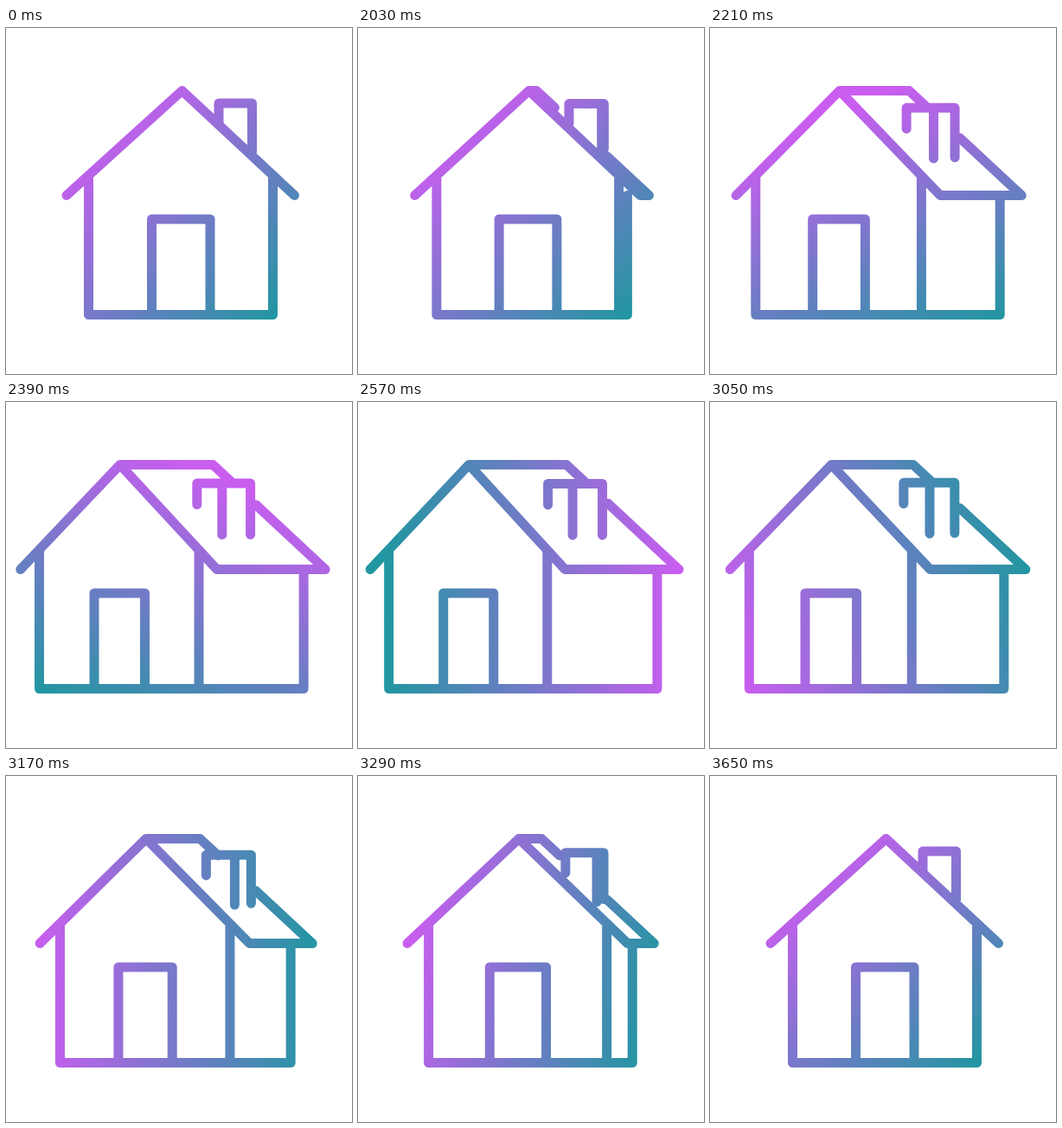
Write an HTML page that moves like this. It is 400 by 400 pixels and loops after 3.68 s.

```html
<!DOCTYPE html>
<html lang="en">
<head>
<meta charset="utf-8">
<title>House</title>
<style>
  html, body { margin: 0; width: 100%; height: 100%; overflow: hidden; background: #fff; }
  svg { display: block; width: 100%; height: 100%; }
</style>
</head>
<body>
<svg viewBox="0 0 400 400">
  <defs>
    <linearGradient id="tint" gradientUnits="userSpaceOnUse">
      <stop offset="0" stop-color="#c95df0"/>
      <stop offset="1" stop-color="#1f97a0"/>
    </linearGradient>
  </defs>
  <path id="house" fill="none" stroke="url(#tint)" stroke-width="11"
        stroke-linecap="round" stroke-linejoin="round"/>
</svg>
<script>
const LOOP = 3680, STEP = 30;
const house = document.getElementById('house');
const tint = document.getElementById('tint');

// Monotone cubic curve through [time, value] keys, flat outside them.
function curve(keys) {
  const slope = i => (keys[i + 1][1] - keys[i][1]) / (keys[i + 1][0] - keys[i][0]);
  const tangents = keys.map((_, i) => {
    if (i === 0 || i === keys.length - 1) return 0;
    const a = slope(i - 1), b = slope(i);
    return a * b <= 0 ? 0 : 2 * a * b / (a + b);
  });
  return time => {
    if (time <= keys[0][0]) return keys[0][1];
    const i = keys.findIndex(key => key[0] > time) - 1;
    if (i < 0) return keys[keys.length - 1][1];
    const [t0, v0] = keys[i], [t1, v1] = keys[i + 1];
    const span = t1 - t0, s = (time - t0) / span;
    const blend = s * s * (3 - 2 * s);
    return v0 + (v1 - v0) * blend
      + span * s * (1 - s) * ((1 - s) * tangents[i] - s * tangents[i + 1]);
  };
}

// 0 is the front view, 1 the fully turned house.
const turnAt = curve([[2000, 0], [2030, .077], [2210, .712], [2330, .92], [2570, .997],
  [2690, 1], [2850, 1], [3050, .836], [3290, .232], [3420, .05], [3560, 0]]);
const angleAt = curve([[2000, 45], [2210, 65], [2570, 180], [3050, 340], [3290, 373], [3650, 405]]);
const lengthAt = curve([[2210, 300], [2570, 345], [3050, 365], [3290, 300]]);

const line = (...points) => 'M' + points.map(p => p.map(n => n.toFixed(2))).join('L');

function housePath(turn) {
  const mix = (a, b) => a + (b - a) * turn;
  const top = 72.5, eave = 193.5, floor = 331.5, wallTop = 174;
  const apex = mix(203.5, 128), nearEave = mix(333.5, 239), farEave = mix(333.5, 371);
  const ridge = mix(203.5, 241);
  const left = mix(95.5, 35.5), middle = mix(308.5, 218.5), right = mix(308.5, 346);
  const doorLeft = mix(168.5, 98.5), doorRight = mix(236, 156.5), doorTop = 221;
  const stackTop = mix(87, 94.5), stackLeft = mix(246, 219.5);
  const stackMiddle = mix(284.5, 248), stackRight = mix(284.5, 282.5);
  const backX = mix(288, 289);
  const backY = top + (eave - top) * (backX - ridge) / (farEave - ridge);
  return [
    line([mix(70, 14), eave], [apex, top], [nearEave, eave], [farEave, eave], [backX, backY]),
    line([apex, top], [ridge, top], [ridge + 21, top + 19.5]),
    line([left, wallTop], [left, floor], [right, floor], [right, eave]),
    line([middle, wallTop], [middle, floor]),
    line([doorLeft, floor], [doorLeft, doorTop], [doorRight, doorTop], [doorRight, floor]),
    line([stackLeft, mix(110, 119)], [stackLeft, stackTop], [stackRight, stackTop],
      [stackRight, mix(139, 154)]),
    line([stackMiddle, stackTop], [stackMiddle, mix(143, 154)])
  ].join('');
}

function aimTint(degrees, length) {
  const angle = degrees * Math.PI / 180;
  const dx = Math.cos(angle) * length / 2, dy = Math.sin(angle) * length / 2;
  const ends = { x1: 200 - dx, y1: 240 - dy, x2: 200 + dx, y2: 240 + dy };
  for (const name in ends) tint.setAttribute(name, ends[name]);
}

function draw() {
  const elapsed = performance.now() % LOOP;
  const time = Math.floor((elapsed - 20) / STEP) * STEP + 20;
  house.setAttribute('d', housePath(turnAt(time)));
  aimTint(angleAt(time), lengthAt(time));
  requestAnimationFrame(draw);
}
draw();
</script>
</body>
</html>
```
